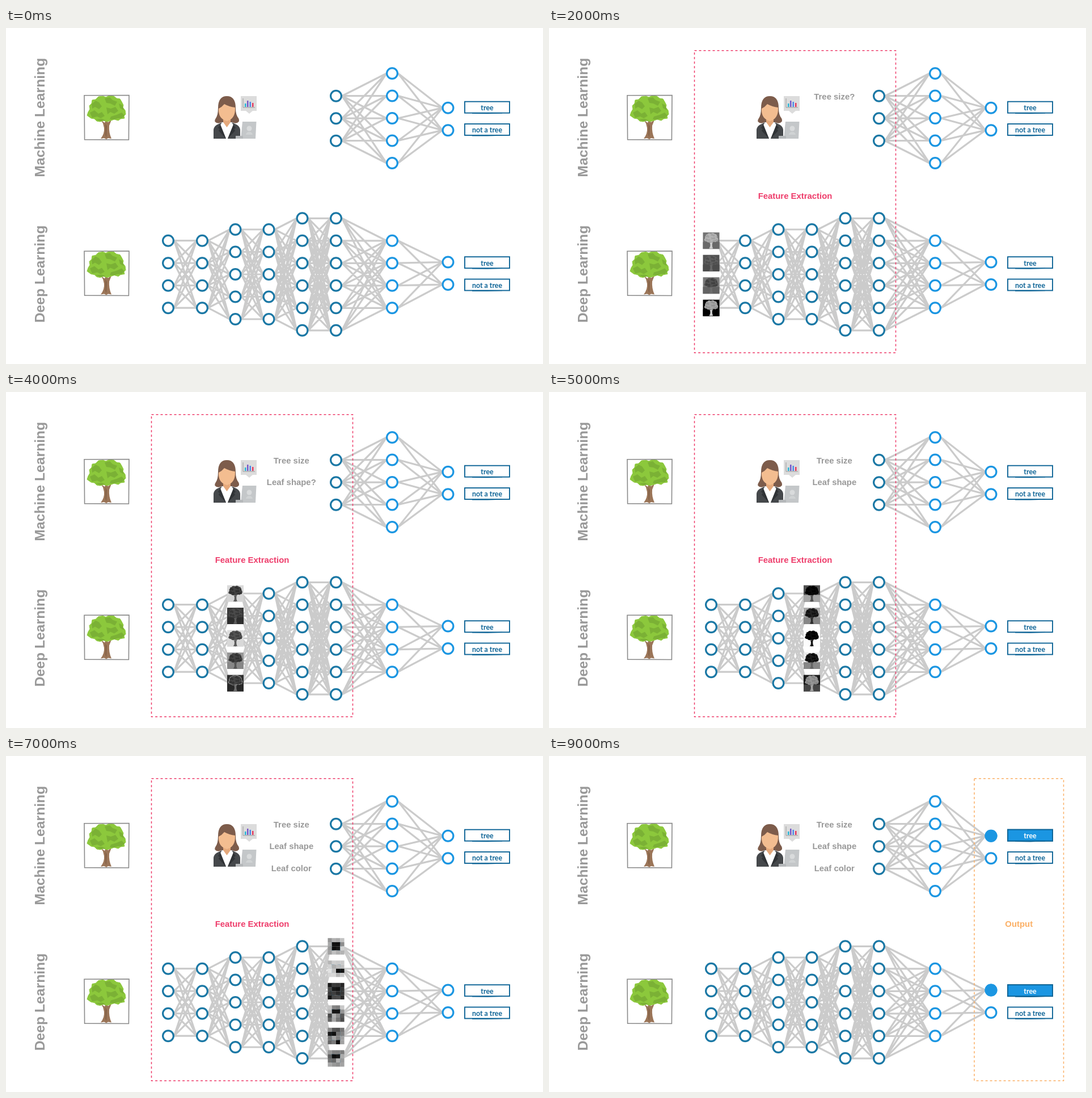
An HTML page for the animation above (10 s loop, 947 by 592 pixels).

```html
<!DOCTYPE html>
<html lang="en">
<head>
<meta charset="utf-8">
<title>Machine Learning and Deep Learning</title>
<style>
  html, body { margin: 0; width: 100%; height: 100%; overflow: hidden; background: #fff; }
  svg { display: block; width: 100vw; height: 100vh; }
  text { font: bold 14.9px "Liberation Sans", Arial, sans-serif; text-anchor: middle; fill: #999; }
  .title { font-size: 24.7px; }
  .tag { font: bold 12.4px Lato, "Open Sans", sans-serif; }
</style>
</head>
<body>
<svg id="stage" viewBox="0 0 947 592"></svg>
<script>
const DARK = '#1b78a5', BRIGHT = '#1b96e2', INK = '#0f6597';
const STEP = 1000, STEPS = 10;
const stage = document.getElementById('stage');
const timed = [];

function add(parent, tag, attrs = {}, text) {
  const el = document.createElementNS('http://www.w3.org/2000/svg', tag);
  for (const key in attrs) el.setAttribute(key, attrs[key]);
  if (text) el.textContent = text;
  parent.appendChild(el);
  return el;
}
const path = (parent, d, fill, more) => add(parent, 'path', { d, fill, ...more });
const rect = (parent, x, y, width, height, fill, more) =>
  add(parent, 'rect', { x, y, width, height, fill, ...more });
const group = (x = 0, y = 0) => add(stage, 'g', { transform: `translate(${x} ${y})` });
const gray = v => `rgb(${v},${v},${v})`;

// Shows an element from one step up to, not including, another.
function during(el, from, to) {
  timed.push({ el, from, to });
  return el;
}

function seeded(seed) {
  return () => {
    seed = (seed * 16807) % 2147483647;
    return seed / 2147483647;
  };
}

// Titles
for (const [text, y] of [['Machine Learning', 157.7], ['Deep Learning', 433.5]])
  add(stage, 'text', { class: 'title', transform: `translate(68 ${y}) rotate(-90)` }, text);

// Tree pictures
const CROWN = 'M5 36L7 30L10 25L9 19L13 15L14 9L20 8L25 3L33 2L38 4L44 1L52 2L57 6L63 7' +
  'L66 12L69 18L68 22L72 27L73 34L70 37L71 41L64 42L60 45L53 43L47 45L40 47L34 45' +
  'L28 47L22 46L18 42L12 41Z';
const TRUNK = 'M29 44L33 50L35 58Q36 68 29 77L35 76L39 78L42 76L48 77Q43 66 44 54L48 44L42 48L38 44L36 49Z';
const SHADE = 'M13 16L20 10L26 13L31 20L26 25L19 21L14 24ZM36 6L45 4L50 9L58 12L54 19L46 15L39 14Z' +
  'M10 31L18 27L25 33L31 30L36 37L29 41L23 38L14 40ZM39 22L47 24L55 21L60 28L53 33L46 30L41 34Z' +
  'M61 15L67 18L70 27L63 23ZM47 38L57 35L66 31L71 36L66 41L59 41L53 43L45 43Z' +
  'M20 43L31 42L38 45L28 46Z';

function drawTree(y) {
  const g = group(138, y);
  path(g, TRUNK, '#9b7558');
  path(g, 'M37 50L40 55L39 75L37 70Z', '#876449');
  path(g, CROWN, '#8cc83c', { stroke: '#8cc83c', 'stroke-linejoin': 'round' });
  path(g, SHADE, '#7bb135');
  path(g, 'M0 .8L79 .5L78.4 79L.6 78.6Z', 'none', { stroke: '#8a8a8a', 'stroke-width': 1.6 });
}
drawTree(118);
drawTree(392.5);

// Analyst with chart and laptop
function drawAnalyst() {
  const g = group(366, 120);
  path(g, 'M5 47Q0 44 4 39Q8 33 8 21Q8 0 23.5 0Q39 0 39 21Q39 33 44 39Q47 44 42 47Q37 49 33 46H14Q10 49 5 47Z', '#7d5c4b');
  path(g, 'M0 75V59Q1 52 9 49L17 45H30L38 49Q46 52 47 59V75Z', '#45484b');
  path(g, 'M15 46L12 51L22 75H25L35 51L32 46Z', '#fff');
  path(g, 'M17 36H30V46L23.5 55L17 46Z', '#e5a97c');
  path(g, 'M9 22Q15 19 19 14Q28 19 38 20Q39 40 23.5 44Q8 40 9 22Z', '#f3bd90');
  path(g, 'M12 50L8 56L11 58L9 61L22 75ZM35 50L39 56L36 58L38 61L25 75Z', '#303336');
  path(g, 'M48 0H76V26H69L63 31L57 26H48Z', '#dcdcdc');
  path(g, 'M52 4V20H73', 'none', { stroke: '#999', 'stroke-width': 1 });
  rect(g, 55, 13, 2.5, 6, '#29b6d8');
  rect(g, 59, 8, 2.5, 11, '#7656c8');
  rect(g, 63.5, 10, 2.5, 9, '#4b8be8');
  rect(g, 68, 12, 2.5, 7, '#e5395f');
  path(g, 'M51 45H75.5L74 75H48Z', '#c4c7c9');
  path(g, 'M39 70H52V75H39Z', '#b5b8ba');
  add(g, 'circle', { cx: 63, cy: 57, r: 4.5, fill: '#d9dbdc' });
  path(g, 'M57 68Q58 63 63 63Q68 63 69 68Z', '#d0d3d4');
}
drawAnalyst();

// Networks
const GAP = 39.5;
const column = (x, top, count, color) => ({
  x, color, ys: Array.from({ length: count }, (_, i) => top + i * GAP)
});
const shallow = [
  column(582, 119.7, 3, DARK),
  column(681, 80, 5, BRIGHT),
  column(779.5, 140.7, 2, BRIGHT)
];
const deep = [
  column(286, 374.7, 4, DARK),
  column(346, 374.7, 4, DARK),
  column(404.5, 355, 5, DARK),
  column(463.5, 355, 5, DARK),
  column(522.5, 335.3, 6, DARK),
  column(582, 335.3, 6, DARK),
  column(681, 374.7, 4, BRIGHT),
  column(779.5, 412.5, 2, BRIGHT)
];

function drawNetwork(columns) {
  let lines = '';
  columns.slice(1).forEach((right, i) => {
    const left = columns[i];
    for (const a of left.ys)
      for (const b of right.ys) lines += `M${left.x + 10.5} ${a}L${right.x - 10} ${b}`;
  });
  path(stage, lines, 'none', { stroke: '#cbcbcb', 'stroke-width': 3.2 });
  for (const { x, color, ys } of columns)
    for (const y of ys)
      add(stage, 'circle', { cx: x, cy: y, r: 9.4, fill: '#fff', stroke: color, 'stroke-width': 3.2 });
}
drawNetwork(shallow);
drawNetwork(deep);

// Feature maps: gray levels of sky, ground, crown and trunk
const maps = [
  [[115, 105, 180, 205], [82, 76, 96, 104], [120, 98, 82, 110], [0, 0, 165, 205]],
  [[150, 120, 70, 90], [60, 70, 130, 150], [190, 150, 90, 80], [40, 55, 105, 180]],
  [[218, 212, 66, 90], [58, 46, 74, 90], [222, 216, 82, 90], [150, 135, 66, 85], [45, 40, 70, 110]],
  [[80, 165, 8, 80], [170, 135, 35, 45], [252, 252, 10, 20], [235, 135, 28, 100], [25, 70, 150, 165]],
  [[55, 150, 90, 90], [50, 70, 85, 65], [185, 165, 228, 215], [60, 105, 175, 80],
   [215, 220, 125, 130], [60, 180, 90, 70]]
];
const SIZE = 29, HALF = SIZE / 2;

function drawMap(x, y, [sky, ground, crown, trunk], step, outlined) {
  const g = during(group(x - HALF, y - HALF), step, step + 1);
  rect(g, 0, 0, SIZE, SIZE, gray(sky));
  rect(g, 0, 17, SIZE, 12, gray(ground));
  const tree = add(g, 'g', { transform: 'translate(.2 .5) scale(.365)' });
  path(tree, TRUNK, gray(trunk));
  path(tree, CROWN, gray(crown), outlined ? { stroke: '#aaa', 'stroke-width': 2.5 } : {});
  path(tree, SHADE, gray(Math.max(0, crown - 18)));
}

maps.forEach((list, c) => {
  const { x, ys } = deep[c];
  list.forEach((tones, i) => drawMap(x, ys[i], tones, c + 2, c === 2 && i === 4));
});

// Coarse maps: base tone, spread, and the cell where a dark patch begins
const coarse = [[165, 90, 1, 1], [200, 60, 2, 2], [55, 70, 1, 1], [130, 150, 1, 1], [90, 150, 0, 1], [135, 90, 1, 1]];
coarse.forEach(([base, spread, dx, dy], i) => {
  const { x, ys } = deep[5];
  const g = during(group(x - HALF, ys[i] - HALF), 7, 8);
  const random = seeded(71 + i * 37);
  const cell = SIZE / 4;
  random();
  for (let row = 0; row < 4; row++)
    for (let col = 0; col < 4; col++) {
      const patch = col >= dx && col <= dx + 1 && row >= dy && row < dy + (i ? 1 : 2);
      const tone = patch ? 12 + random() * 14 : base + (random() - .5) * spread;
      rect(g, col * cell, row * cell, cell + .1, cell + .1, gray(Math.round(tone)));
    }
});

// Answers
function drawAnswer(text, y, chosen) {
  const g = group(809, y - 10);
  rect(g, 0, 0, 79, 20, chosen ? BRIGHT : '#fff', { stroke: INK, 'stroke-width': 1.9 });
  path(g, 'M13 20.8L40 21L66 20.2', 'none', { stroke: INK, 'stroke-width': 1.2 });
  add(g, 'text', { class: 'tag', x: 39.5, y: 15.4, style: `fill:${chosen ? '#fff' : INK}` }, text);
  return g;
}
for (const { x, ys } of [shallow[2], deep[7]]) {
  const top = ys[0] + (ys[0] < 300 ? -1 : .7);
  drawAnswer('tree', top, false);
  drawAnswer('not a tree', top + 39.3, false);
  during(drawAnswer('tree', top, true), 9, 10);
  during(add(stage, 'circle', { cx: x, cy: ys[0], r: 11, fill: BRIGHT }), 9, 10);
}

// Hand-picked features: first as a question, then settled
[['Tree size', 126, 2], ['Leaf shape', 164.3, 4], ['Leaf color', 203.2, 6]].forEach(([text, y, from]) => {
  during(add(stage, 'text', { x: 503.3, y }, text + '?'), from, from + 1);
  during(add(stage, 'text', { x: 503.3, y }, text), from + 1, STEPS);
});

// Stage outlines
const phases = [
  ['Input', 98.5, 256.5, '#7b61c4', 1, 2],
  ['Feature Extraction', 256.5, 611.5, '#ee3d6b', 2, 8],
  ['Classification', 611.5, 750, '#2fae9b', 8, 9],
  ['Output', 750, 907.5, '#fbb066', 9, 10]
];
for (const [text, left, right, color, from, to] of phases) {
  const g = during(group(), from, to);
  rect(g, left, 39.7, right - left, 532.6, 'none', {
    stroke: color, 'stroke-width': 1.5, 'stroke-dasharray': '4 4'
  });
  add(g, 'text', { x: (left + right) / 2, y: 301.3, style: `fill:${color}` }, text);
}

// Playback
const start = performance.now();
let shown = -1;
function play() {
  const step = Math.floor((performance.now() - start) / STEP) % STEPS;
  if (step !== shown) {
    shown = step;
    for (const { el, from, to } of timed)
      el.style.display = step >= from && step < to ? '' : 'none';
  }
  requestAnimationFrame(play);
}
play();
</script>
</body>
</html>
```
